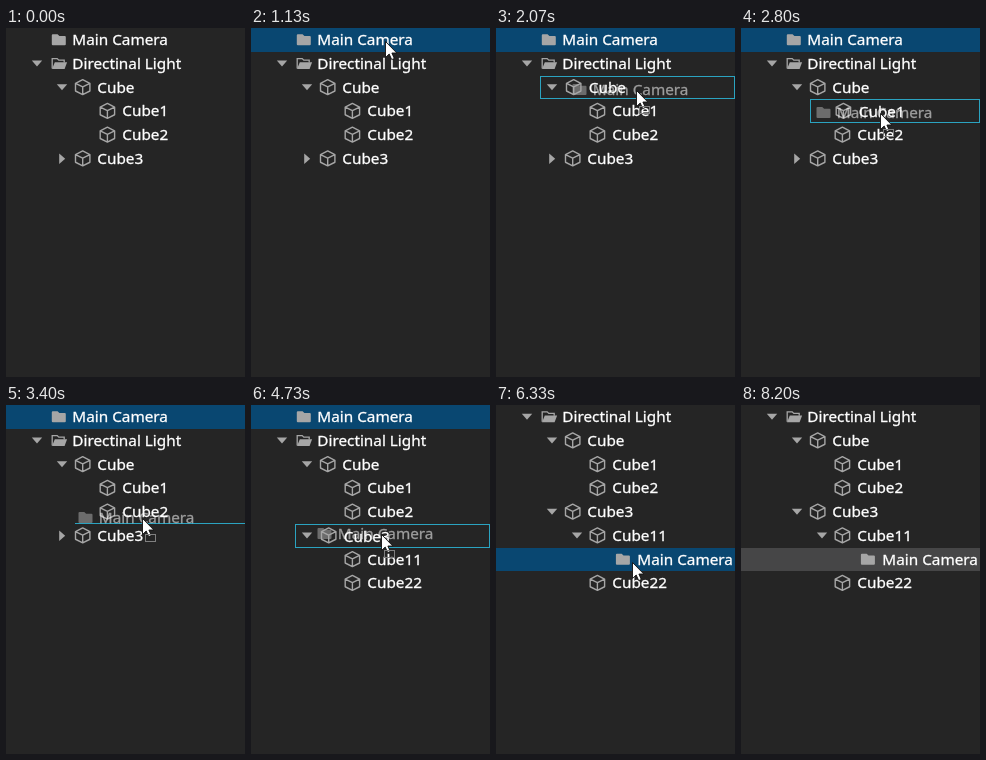
Write an HTML page that moves like this. It is 239 px wide and 349 px high and loops after 8270 ms.

```html
<!DOCTYPE html>
<html lang="en">
<head>
<meta charset="utf-8">
<title>Tree drag and drop</title>
<style>
  html, body { margin: 0; width: 100%; height: 100%; overflow: hidden; background: #252525; }
  svg { display: block; width: 239px; height: 349px; }
  text { font: 15.3px "Noto Sans", "Open Sans", sans-serif; fill: #fff; stroke: #fff; stroke-width: .3px; white-space: pre; }
</style>
</head>
<body>
<svg id="stage" viewBox="0 0 239 349" xmlns="http://www.w3.org/2000/svg"></svg>
<script>
const LOOP = 8270, TICKS_PER_MS = 0.015, LAST_TICK = 123;
const ROW = 23.75, INDENT = 25;
const GRAY = '#a6a6a6', ACCENT = '#2ba3c0';
const stage = document.getElementById('stage');

// Moments of the story, in ticks
const SELECT = 17, DRAG = 21, EXPAND = 71, RELEASE = 94, DROP = 95, LEAVE = 115, BLUR = 123;

// Pointer path: tick, x, y, and whether the move into this point slows down
const path = [
  [1, 217, 303], [11, 134, 13, true], [20, 134, 13], [21, 134, 20],
  [31, 140, 62, true], [33, 141, 62], [35, 141, 67], [36, 141, 67],
  [49, 137, 105], [51, 136, 113], [57, 130, 129, true], [74, 130, 129],
  [79, 136, 159, true], [84, 136, 159], [87, 136, 157], [110, 136, 157],
  [111, 138, 170], [114, 175, 335]
];

const node = (label, depth, icon = 'cube', arrow = '') => ({ label, depth, icon, arrow });
const camera = depth => node('Main Camera', depth, 'folder');

function treeAt(tick) {
  const dropped = tick >= DROP, open = tick >= EXPAND;
  const rows = [
    node('Directinal Light', 0, 'openFolder', 'down'),
    node('Cube', 1, 'cube', 'down'), node('Cube1', 2), node('Cube2', 2),
    node('Cube3', 1, 'cube', open ? 'down' : 'right')
  ];
  if (!dropped) rows.unshift(camera(0));
  if (open) rows.push(node('Cube11', 2, 'cube', dropped ? 'down' : ''));
  if (dropped) rows.push(camera(3));
  if (open) rows.push(node('Cube22', 2));
  return rows;
}

// Icons are centred on 0,0
const icons = {
  cube: `<path d="M-.8-7.7 6.4-4V3.7L-.8 7.3-8 3.7V-4ZM-8-4-.8-.5 6.4-4M-.8-.5V7.3" fill="none" stroke="${GRAY}" stroke-width="1.4" stroke-linejoin="round"/>`,
  folder: `<path d="M-6-5.5H-1.2L.6-3.8H6Q7-3.8 7-2.8V4.5Q7 5.5 6 5.5H-6Q-7 5.5-7 4.5V-4.5Q-7-5.5-6-5.5Z" fill="${GRAY}"/>`,
  openFolder: `<path d="M-6.6 5V-5H-1.6L0-3.4H5.4V-1" fill="none" stroke="${GRAY}" stroke-width="1.3"/><path d="M-4-1.2H8.3L5.8 5.5H-6.8Z" fill="${GRAY}"/>`
};
const arrows = { down: 'M-5.2-3.2H5.2L0 2.8Z', right: 'M-2.8-5.2V5.2L3.2 0Z' };

const at = (x, y, body) => `<g transform="translate(${x} ${y})">${body}</g>`;
const rect = (x, y, w, h, attrs) => `<rect x="${x}" y="${y}" width="${w}" height="${h}" ${attrs}/>`;

function drawRow(row, index, boxed) {
  const x = row.depth * INDENT, mid = index * ROW + 11.8, shift = boxed ? 1 : 0;
  const iconX = 52.8 + row.depth * 24.7 + shift;
  const arrow = row.arrow ? at(31 + x, mid + .2, `<path d="${arrows[row.arrow]}" fill="${GRAY}"/>`) : '';
  return arrow + at(iconX, mid, icons[row.icon]) +
    `<text x="${66.3 + x + shift * 1.5}" y="${mid + 5.3 + shift * .7}">${row.label}</text>`;
}

function pointerAt(tick) {
  if (tick < path[0][0] || tick >= LEAVE) return null;
  const next = path.findIndex(p => p[0] >= tick);
  if (next < 1) return { x: path[0][1], y: path[0][2] };
  const [t0, x0, y0] = path[next - 1], [t1, x1, y1, slow] = path[next];
  let k = (tick - t0) / (t1 - t0);
  if (slow) k = Math.sin(k * Math.PI / 2);
  return { x: Math.round(x0 + (x1 - x0) * k), y: Math.round(y0 + (y1 - y0) * k) };
}

// The middle third of a row drops inside it, the outer thirds beside it
function dropTarget(y) {
  const index = Math.floor(y / ROW), part = y / ROW - index;
  if (index < 1) return null;
  const place = part < 1 / 3 ? 'before' : part > 2 / 3 ? 'after' : 'inside';
  return { index, place };
}

function drawTarget({ index, place }, row) {
  const x = 19 + row.depth * INDENT, top = Math.round(index * ROW), bottom = Math.round((index + 1) * ROW);
  if (place === 'inside')
    return rect(x + .5, top + .5, 238 - x, bottom - top - 1, `fill="none" stroke="${ACCENT}"`);
  return rect(x, (place === 'before' ? top : bottom) - 1, 239 - x, 1, `fill="${ACCENT}"`);
}

const drawGhost = ({ x, y }) => `<g opacity=".55">${at(x - 56.5, y - .5, icons.folder)}` +
  `<text x="${x - 43.2}" y="${y + 5}">Main Camera</text></g>`;

const drawPointer = ({ x, y }, dragging) => at(x, y,
  '<path d="M.5.5V16.5L4.2 13 6.7 18.6 9.3 17.5 6.9 12H11.8Z" fill="#fff" stroke="#111" stroke-width=".9"/>' +
  (dragging ? rect(3.5, 16.5, 10, 7, 'fill="none" stroke="#111"') +
    rect(3.5, 16.5, 10, 7, 'fill="none" stroke="#eee" stroke-dasharray="1 1"') : ''));

function draw(tick) {
  const rows = treeAt(tick), pointer = pointerAt(tick);
  const dragging = tick >= DRAG && tick < RELEASE;
  const target = dragging ? dropTarget(pointer.y) : null;
  let out = rect(0, 0, 239, 349, 'fill="#252525"');
  if (tick >= SELECT) {
    const index = rows.findIndex(r => r.icon === 'folder');
    const top = Math.round(index * ROW);
    out += rect(0, top, 239, Math.round((index + 1) * ROW) - top, `fill="${tick >= BLUR ? '#464647' : '#094771'}"`);
  }
  rows.forEach((row, i) => {
    out += drawRow(row, i, target && target.index === i && target.place === 'inside');
  });
  if (target) out += drawTarget(target, rows[target.index]);
  if (dragging) out += drawGhost(pointer);
  if (pointer) out += drawPointer(pointer, dragging);
  stage.innerHTML = out;
}

const start = performance.now();
let shown = -1;
function frame() {
  const time = (performance.now() - start) % LOOP;
  const tick = Math.min(LAST_TICK, Math.floor((time + 4) * TICKS_PER_MS));
  if (tick !== shown) draw(shown = tick);
  requestAnimationFrame(frame);
}
frame();
</script>
</body>
</html>
```
